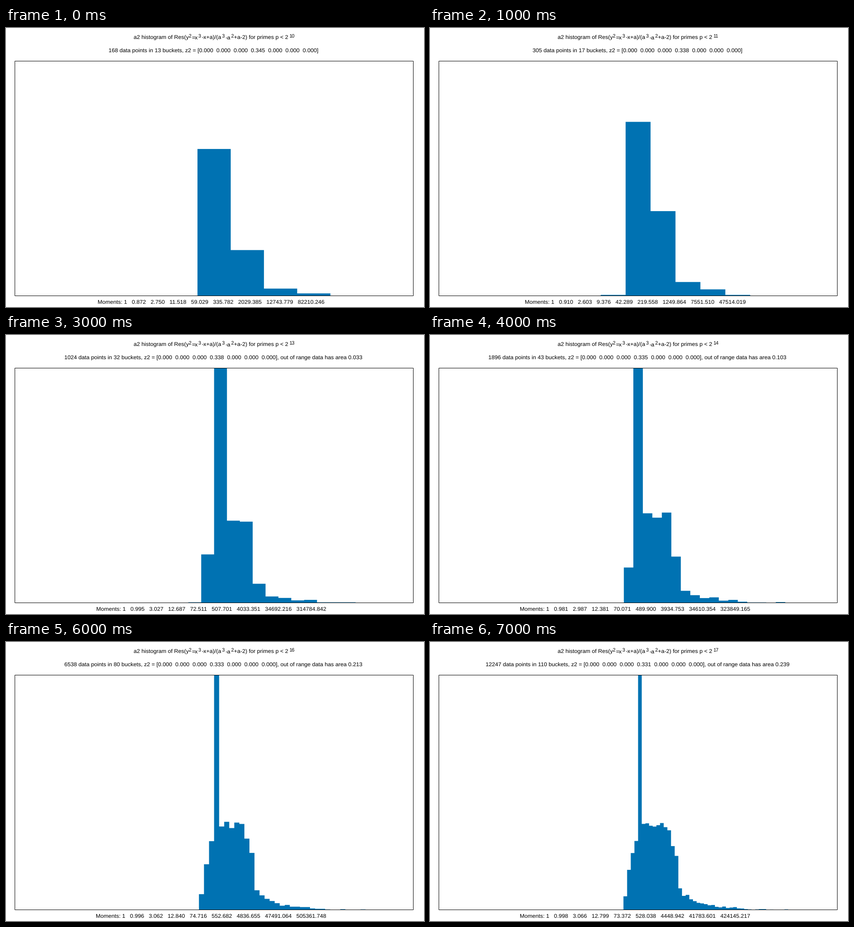
A matplotlib script that plays this animation: 917x611 px, repeating every 8 s.

```python
import math

import matplotlib.pyplot as plt
import numpy as np
from matplotlib.animation import FuncAnimation
from matplotlib.patches import Rectangle

W, H, DPI = 917, 611, 64
PX = 72 / DPI                   # one pixel in points
BLUE = "#0072B2"
LEFT, SPAN = 19, 875            # horizontal extent of the plot
BASE, TALL = 586.5, 514         # bottom line and height of the plot
RANGE = 15                      # a2 lies in [-15, 15]
FIRST, LAST = 10, 17            # powers of two bounding the primes
BAD = (2, 3, 83, 131)           # primes of bad reduction


# Modular arithmetic on float arrays, exact below 2**53.

def mod(x, p):
    return x - p * np.floor(x / p)


def power(x, e, p):
    result = np.ones_like(x)
    while e.any():
        result = np.where(e % 2 == 1, mod(result * x, p), result)
        x = mod(x * x, p)
        e = np.floor(e / 2)
    return result


def hasse(p, u, v, d):
    """Coefficient of x^(p-1) in (x^3-x+a)^((p-1)/2), a = u + v sqrt(d).

    The primes p must ascend; all of them are handled side by side.
    """
    m = (p - 1) / 2
    odd = m % 2
    h = (m - odd) / 2

    # binomial(m, h) as top / low, two factors at a time
    top = np.where(h % 2 == 1, m, 1.0)
    low = np.where(h % 2 == 1, h, 1.0)
    for s in range(1, int(h[-1]), 2):
        k = np.searchsorted(h, s + 1)
        f = m[k:] - h[k:] + s
        top[k:] = mod(top[k:] * f * (f + 1), p[k:])
        low[k:] = mod(low[k:] * (s * (s + 1)), p[k:])

    # sum of the multinomial terms by Horner's rule, as (re, im) / den
    i0 = (m + odd) / 2
    j0 = 2 * m - 3 * i0
    uu, vv = mod(u * u + d * v * v, p), mod(2 * u * v, p)
    dv = mod(d * vv, p)
    re, im, den = np.ones_like(p), np.zeros_like(p), np.ones_like(p)
    for n in range(int(p[-1]) // 12, -1, -1):
        k = np.searchsorted(p, 12 * n)
        q, j, e = p[k:], j0[k:] - 3 * n, odd[k:] + 2 * n
        c = mod(-j * (j - 1) * (j - 2), q)
        below = mod((i0[k:] + n + 1) * (e + 1) * (e + 2), q)
        den[k:] = mod(den[k:] * below, q)
        a, b = re[k:], im[k:]
        re[k:], im[k:] = (mod(c * (a * uu[k:] + b * dv[k:]) + den[k:], q),
                          mod(c * (a * vv[k:] + b * uu[k:]), q))

    scale = mod(top * power(mod(low * den, p), p - 2, p), p)
    lead = np.where(odd == 1, (m - 1) / 2, 1) * (1 - 2 * (j0 % 2))
    scale = mod(scale * lead, p)
    re, im = mod(re * scale, p), mod(im * scale, p)
    return (np.where(odd == 1, mod(re * u + d * im * v, p), re),
            np.where(odd == 1, mod(re * v + im * u, p), im))


def quadratic_trace(p, u, d, t):
    """Trace over the field of p^2 elements, given its residue t mod p."""
    one = np.array([np.ones_like(p), np.zeros_like(p)])
    b = np.array([u, np.ones_like(p)])

    def mul(f, g):
        return mod(np.array([f[0] * g[0] + d * mod(f[1] * g[1], p),
                             f[0] * g[1] + f[1] * g[0]]), p)

    def step(r, s, x):
        """Twice r, and r + s where s - r has abscissa x."""
        (X, Z), (U, V) = r, s
        xv, uz, zv = mul(X, V), mul(U, Z), mul(Z, V)
        both, cross = mul(X, U) + zv, mul(b, mul(zv, xv + uz))
        total = np.array([mul(both, both) - 4 * cross,
                          x * mul(xv - uz, xv - uz)])
        xx, zz, xz = mul(X, X), mul(Z, Z), mul(X, Z)
        double = np.array([
            mul(xx + zz, xx + zz) - 8 * mul(b, mul(xz, zz)),
            4 * (mul(xz, xx - zz) + mul(b, mul(zz, zz)))])
        return double, total

    def vanishes(x, order):
        r, s = np.array([one, 0 * one]), np.array([x * one, one])
        for bit in range(2 * LAST, -1, -1):
            on = (order >> bit) & 1 == 1
            r, s = np.where(on, s, r), np.where(on, r, s)
            r, s = step(r, s, x)
            r, s = np.where(on, s, r), np.where(on, r, s)
        return (mod(r[1], p) == 0).all(axis=0)

    result = t.copy()
    for k in range(-2, 2):
        guess = t + k * p
        fits = np.ones(len(p), bool)
        for x in (2, 3):
            norm = mod((x ** 3 - x + u) ** 2 - d, p)
            # a non-square puts the point on the quadratic twist
            sign = np.where(power(norm, (p - 1) / 2, p) == 1, 1, -1)
            fits &= vanishes(x, (p * p + 1 - sign * guess).astype(np.int64))
        result[fits] = guess[fits]
    return result


def good_primes(limit):
    sieve = np.ones(limit, bool)
    sieve[:2] = False
    for k in range(2, math.isqrt(limit) + 1):
        if sieve[k]:
            sieve[k * k::k] = False
    sieve[list(BAD)] = False
    return np.flatnonzero(sieve)


def a2_values(primes):
    """Normalised a2 of the restriction of y^2=x^3-x+a for every prime."""
    x = np.arange(primes[-1] + 1, dtype=float)
    cubic = ((x - 1) * x + 1) * x - 2
    lanes = []
    for index, p in enumerate(primes):
        ratio = cubic[:p] / p
        roots = np.flatnonzero(ratio == np.floor(ratio))
        lanes += [(index, p, r, len(roots)) for r in roots]
    index, p, r, count = np.array(lanes, float).T
    index = index.astype(int)

    # one root: use the conjugate pair u +- sqrt(d); three: the roots
    split = count == 3
    half = (p + 1) / 2
    disc = mod(mod(2 * r - 3 - 3 * r * r, p) * mod(half * half, p), p)
    u = np.where(split, r, mod((1 - r) * half, p))
    v = np.where(split, 0.0, 1.0)
    d = np.where(split, 0.0, disc)
    re, im = hasse(p, u, v, d)

    values = np.zeros(len(primes))
    pair = ~split
    norm = mod(re * re - d * im * im, p)
    t = quadratic_trace(p[pair], u[pair], d[pair], norm[pair])
    values[index[pair]] = 1 - t / p[pair]

    t = np.where(re > p / 2, re - p, re)
    s = (t / np.sqrt(p))[split].reshape(-1, 3)
    products = (s.sum(axis=1) ** 2 - (s ** 2).sum(axis=1)) / 2
    values[index[split][::3]] = 3 + products
    return values


primes = good_primes(2 ** LAST)
values = a2_values(primes)

plt.rcParams["font.family"] = "Liberation Sans"
plt.rcParams["text.hinting"] = "no_hinting"
fig = plt.figure(figsize=(W / DPI, H / DPI), dpi=DPI, facecolor="white")
ax = fig.add_axes([0, 0, 1, 1])


def label(x, y, text="", size=12.33, ha="left"):
    return ax.text(x, y, text, fontsize=size * PX, color="black",
                   ha=ha, va="baseline")


def raised(x, text=""):
    return label(x, 21, text, size=10.6)


for x, part in [(279.6, "a2 histogram of Res(y"), (407.5, "=x"),
                (429.6, "-x+a)/(a"), (481.6, "-a"),
                (500.5, "+a-2) for primes p < 2")]:
    label(x, 25, part)
for x, exponent in [(400.6, "2"), (421.7, "3"), (473.7, "3"), (493.7, "2")]:
    raised(x, exponent)

bound = raised(620.8)
info_text = label(455.2, 54, ha="center")
moment_text = label(450, 604, ha="center")

bars = ax.stairs([BASE], [0, 1], baseline=BASE, fill=True,
                 color=BLUE, snap=False)
ax.add_patch(Rectangle((19.5, 72.5), 874, TALL, fill=False, snap=False,
                       edgecolor="black", linewidth=PX, zorder=3))
ax.set_xlim(0, W)
ax.set_ylim(H, 0)
ax.axis("off")


def draw(i):
    bits = FIRST + i
    data = values[primes < 2 ** bits]
    points = len(data)
    buckets = math.isqrt(points + len(BAD))

    place = (data + RANGE) / (2 * RANGE) * (buckets - 1)
    counts = np.bincount(np.floor(place + 0.5).astype(int), minlength=buckets)
    peak = RANGE * buckets
    clipped = np.maximum(counts - peak, 0).sum() / points
    edges = LEFT + SPAN * (np.arange(buckets + 1) - 0.5) / (buckets - 1)
    bars.set_data(BASE - TALL * np.minimum(counts / peak, 1), edges, BASE)

    z2 = "  ".join(f"{np.mean(data == n):.3f}" for n in range(-3, 4))
    info = f"{points} data points in {buckets} buckets, z2 = [{z2}]"
    if clipped:
        info += f", out of range data has area {clipped:.3f}"
    moments = [f"{np.mean(data ** n):.3f}" for n in range(1, 9)]

    bound.set_text(str(bits))
    info_text.set_text(info)
    moment_text.set_text("Moments: " + "   ".join(["1"] + moments))
    return bound, info_text, moment_text, bars


anim = FuncAnimation(fig, draw, frames=LAST - FIRST + 1, interval=1000,
                     repeat=True, repeat_delay=0)
plt.show()
```
